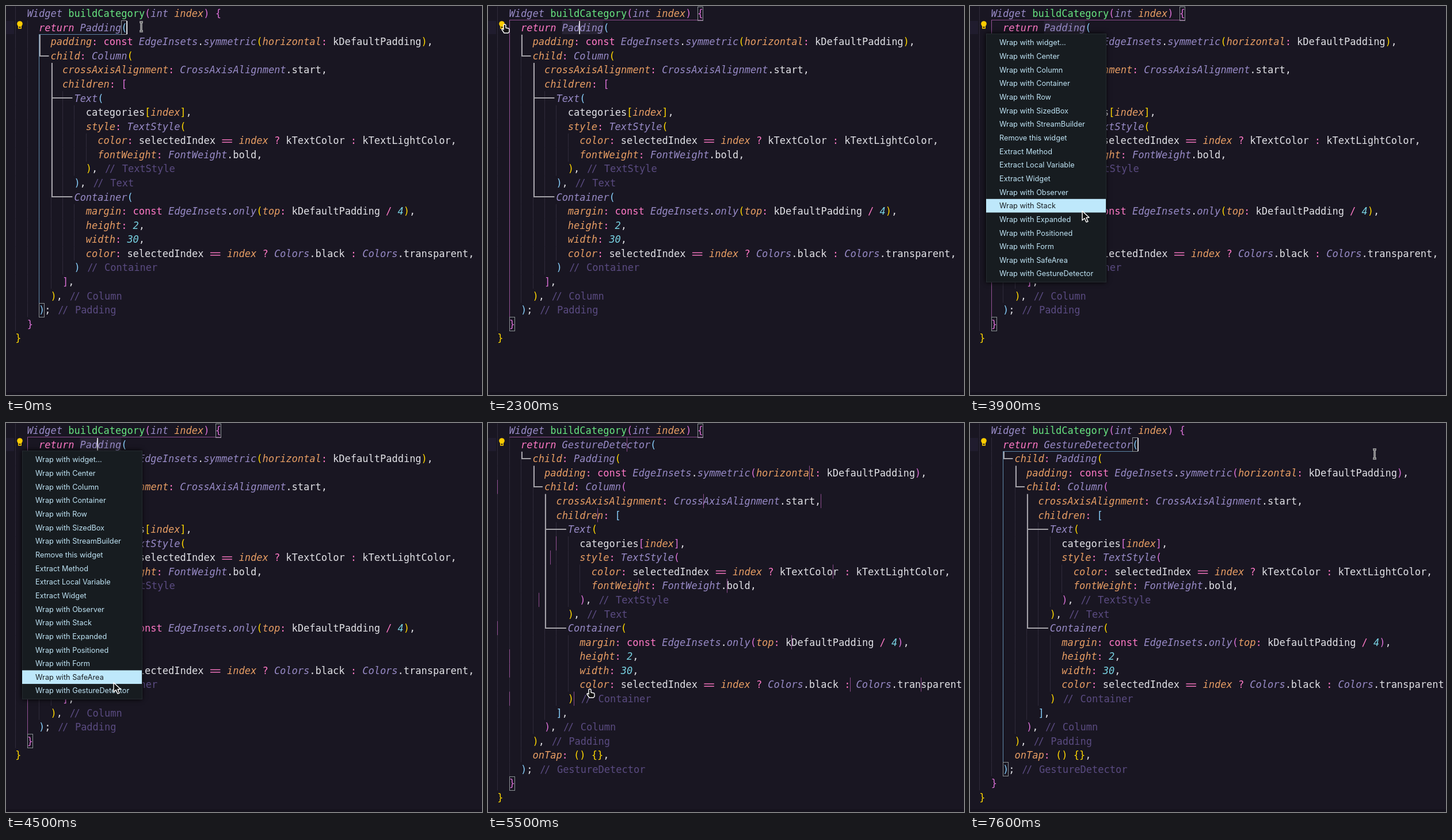
These frames come from a looping animation (827x677 px, 8000 ms). An HTML page with a canvas:

```html
<!DOCTYPE html>
<html lang="en">
<head>
<meta charset="utf-8">
<title>Wrap a widget</title>
<style>
html, body { margin: 0; width: 827px; height: 677px; overflow: hidden; background: #191622; }
canvas { display: block; }
</style>
</head>
<body>
<canvas id="stage" width="827" height="677"></canvas>
<script>
const g = document.getElementById('stage').getContext('2d');
const LOOP = 8000, TICK = 100;
const CW = 10.22, LH = 24.57;
const colX = col => 16.2 + col * CW;
const rowY = row => 0.7 + row * LH;

const BG = '#191622', FG = '#e1e1e6', PINK = '#ff79c6', PURPLE = '#988bc7', GREEN = '#67e480',
  CYAN = '#78d1e1', ORANGE = '#e89e64', COMMENT = '#5a4b81';
const BRACKETS = ['#ffd700', '#da70d6', '#87cefa'];

const body = `padding: const EdgeInsets.symmetric(horizontal: kDefaultPadding),
child: Column(
  crossAxisAlignment: CrossAxisAlignment.start,
  children: [
    Text(
      categories[index],
      style: TextStyle(
        color: selectedIndex == index ? kTextColor : kTextLightColor,
        fontWeight: FontWeight.bold,
      ), // TextStyle
    ), // Text
    Container(
      margin: const EdgeInsets.only(top: kDefaultPadding / 4),
      height: 2,
      width: 30,
      color: selectedIndex == index ? Colors.black : Colors.transparent,
    ) // Container
  ],
), // Column`.split('\n');
const indent = (lines, n) => lines.map(line => ' '.repeat(n) + line);
const method = (name, lines) => [
  '  Widget buildCategory(int index) {', `    return ${name}(`,
  ...indent(lines, 6), `    ); // ${name}`, '  }', '}'];
const before = method('Padding', body);
const after = method('GestureDetector',
  ['child: Padding(', ...indent(body, 2), '), // Padding', 'onTap: () {},']);

const menu = ['Wrap with widget...', ...'Center Column Container Row SizedBox StreamBuilder'.split(' ').map(w => 'Wrap with ' + w),
  'Remove this widget', 'Extract Method', 'Extract Local Variable', 'Extract Widget',
  ...'Observer Stack Expanded Positioned Form SafeArea GestureDetector'.split(' ').map(w => 'Wrap with ' + w)];

// Scope line pieces scattered by the edit: row, column
const strays = [[1, 22], [3, 53], [4, 0], [5, 35], [5, 55], [6, 17], [8, 10], [9, 9], [10, 57], [11, 24], [11, 39],
  [12, 7], [14, 0], [15, 50], [16, 2], [17, 2], [18, 60], [18, 72], [19, 2], [19, 13]];

// Pointer path: time, x, y
const path = [[0, 235, 36], [400, 235, 36], [800, 162, 38], [900, 162, 38], [1100, 160, 38], [1700, 160, 38],
  [2300, 29, 32], [3500, 29, 32], [3800, 172, 290], [3900, 195, 357], [4400, 189, 446], [4500, 187, 452],
  [4900, 177, 463], [5600, 177, 463], [5900, 360, 70], [6000, 360, 70], [6200, 385, 23], [6600, 300, 38],
  [6900, 300, 38], [7100, 703, 54], [LOOP, 703, 54]];
const pointers = {
  arrow: new Path2D('M0 0V16L4 12.5L7 19L10 18L7 11.5L12 11Z'),
  hand: new Path2D('M-2 1Q0-1 2 1V6L7 7Q8 7 8 9V13L6 15H-1L-5 9Q-5 7-3 8L-2 9Z'),
  beam: new Path2D('M-3-8H3M0-8V8M-3 8H3')
};

function rect(x, y, w, h, color) {
  g.fillStyle = color;
  g.fillRect(x, y, w, h);
}

function style(word, next) {
  if (word === 'return') return [PINK, true];
  if (/^(const|[?:/])$/.test(word)) return [PINK];
  if (/^\d/.test(word)) return [CYAN, true];
  if (/^\w/.test(word) && next === ':' || word === 'index') return [ORANGE, true];
  if (/^([A-Z]\w*|int|symmetric|only)$/.test(word)) return [PURPLE, true];
  if (word === 'buildCategory') return [GREEN];
  return [FG];
}

function drawCode(lines) {
  let depth = 1;
  g.textBaseline = 'alphabetic';
  lines.forEach((line, row) => {
    const top = rowY(row), base = top + 18.4;
    for (let col = 0; col < line.search(/\S/); col += 2)
      rect(Math.round(colX(col)), top, 1, LH, '#2f2b3a');
    for (const { 0: word, index } of line.matchAll(/\/\/.*|==|\w+|\S/g)) {
      const x = colX(index);
      let [color, italic] = style(word, line[index + word.length]);
      if ('([{'.includes(word)) color = BRACKETS[depth++ % 3];
      else if (')]}'.includes(word)) color = BRACKETS[--depth % 3];
      g.font = `${italic ? 'italic ' : ''}17px "DejaVu Sans Mono", monospace`;
      if (word === '==') {
        for (const dy of [10.3, 14.6]) rect(x + 1.5, top + dy, 2 * CW - 3, 1.4, PINK);
      } else if (word.startsWith('//')) {
        g.fillStyle = COMMENT;
        g.fillText('/', x + 2.5, base);
        g.fillText('/', x + CW, base);
        g.fillText(word.slice(3), x + 3 * CW + 1.5, base);
      } else {
        g.fillStyle = color;
        g.fillText(word, x, base);
      }
    }
  });
}

function branch(col, row, targets, endCol) {
  const x = Math.round(colX(col) + 1), color = '#a5a3a9';
  const mid = r => Math.round(rowY(r) + LH / 2);
  rect(x, rowY(row), 2, mid(targets.at(-1)) - rowY(row), color);
  for (const r of targets) rect(x, mid(r) - 1, colX(endCol) - 3 - x, 2, color);
}

function drawTree(shift) {
  if (shift) branch(4, 2, [2], 6);
  branch(4 + shift * 2, 2 + shift, [3 + shift], 6 + shift * 2);
  branch(6 + shift * 2, 4 + shift, [6 + shift, 13 + shift], 10 + shift * 2);
}

// Outlines a pair of brackets and, unless scattered, the scope between them
function drawPair(row, col, endRow, endCol, color, scattered) {
  const x = Math.round(colX(endCol)), y = Math.round(rowY(row + 1));
  g.globalAlpha = 0.6;
  if (!scattered) rect(x, y, 1, rowY(endRow + 1) - y, color);
  rect(x, y - 1, colX(col + 1) - x, 1, color);
  g.globalAlpha = 1;
  g.strokeStyle = '#8b9295';
  g.lineWidth = 1;
  for (const [r, c] of [[row, col], [endRow, endCol]])
    g.strokeRect(Math.round(colX(c)) + 0.5, Math.round(rowY(r)) + 0.5, 9, 24);
}

function drawBulb() {
  g.fillStyle = '#ffcc00';
  g.beginPath();
  g.arc(24, 31, 4.8, 0, 7);
  g.fill();
  g.fillRect(21, 33, 6, 6.5);
  rect(22.3, 36, 3.4, 1.8, BG);
}

function drawMenu(y) {
  const top = 52, step = 23.65;
  const active = y < top ? -1 : Math.floor((y - top) / step);
  g.save();
  g.shadowColor = '#000';
  g.shadowBlur = 8;
  rect(28, 48, 208, 433, '#171c20');
  g.restore();
  g.strokeStyle = '#252b30';
  g.lineWidth = 1;
  g.strokeRect(28.5, 48.5, 208, 432);
  g.font = '12.73px Inter, sans-serif';
  g.textBaseline = 'alphabetic';
  menu.forEach((label, i) => {
    const mid = 64 + i * step;
    if (i === active) rect(28, mid - 12, 208, step, '#bee8fb');
    g.fillStyle = i === active ? '#191e22' : '#bfe4f5';
    g.fillText(label, 51, mid + 4.4);
  });
}

function pointerAt(t) {
  const i = path.findIndex(p => p[0] > t);
  const [t0, x0, y0] = path[i - 1], [t1, x1, y1] = path[i];
  const k = (t - t0) / (t1 - t0);
  return [x0 + (x1 - x0) * k, y0 + (y1 - y0) * k];
}

function drawPointer(kind, x, y) {
  const shape = pointers[kind], beam = kind === 'beam';
  g.save();
  g.translate(x, y);
  g.lineJoin = 'round';
  g.strokeStyle = '#fff';
  g.lineWidth = beam ? 3 : 1.4;
  if (!beam) {
    g.fillStyle = '#111';
    g.fill(shape);
  }
  g.stroke(shape);
  if (beam) {
    g.strokeStyle = '#111';
    g.lineWidth = 1;
    g.stroke(shape);
  }
  g.restore();
}

function draw(t) {
  const within = (a, b) => t >= a && t < b;
  const edited = t >= 5400, menuOpen = within(3400, 5300);
  const [x, y] = pointerAt(t);

  rect(0, 0, 827, 677, BG);
  rect(0, 672, 827, 5, '#15121d');
  rect(0, 26, 14, 23, '#201c2e');
  if (within(1600, 5400)) rect(colX(11), 26, 7 * CW, 23, '#272333');

  drawCode(edited ? after : before);
  if (within(1400, 6700)) drawPair(0, 34, edited ? 25 : 22, 2, BRACKETS[1], edited);
  else if (edited) drawPair(1, 26, 24, 4, BRACKETS[2]);
  else drawPair(1, 18, 21, 4, BRACKETS[2]);
  drawTree(edited ? 1 : 0);

  if (within(5400, 6700)) {
    g.globalAlpha = 0.6;
    for (const [row, col] of strays) rect(Math.round(colX(col)), rowY(row), 1, LH, BRACKETS[1]);
    g.globalAlpha = 1;
  }

  const hidden = within(500, 1000) || within(3600, 4100) || within(4600, 6600) || within(7100, 7600);
  const caret = t < 1300 ? 19 : t < 6600 ? 14 : 27;
  if (!hidden) rect(colX(caret) - 1, 26, 1.6, 23, '#f4f4f6');

  drawBulb();
  if (menuOpen) drawMenu(y);
  const hand = within(2300, 3400) || within(5300, 5600);
  drawPointer(hand ? 'hand' : menuOpen ? 'arrow' : 'beam', x, y);
}

let shown = -1;
function frame() {
  const tick = Math.floor(performance.now() % LOOP / TICK);
  if (tick !== shown) draw((shown = tick) * TICK);
  requestAnimationFrame(frame);
}
frame();
</script>
</body>
</html>
```
